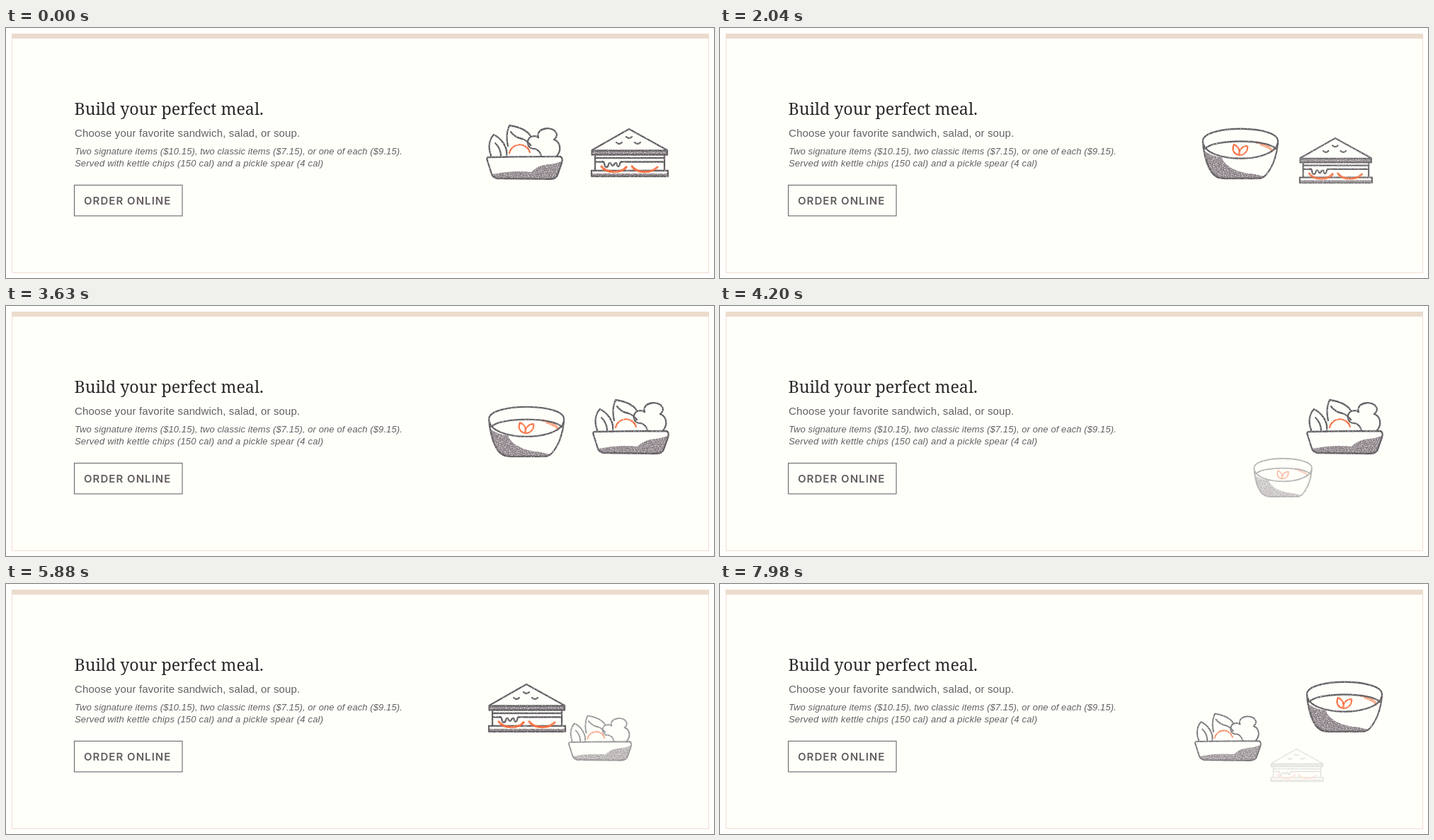
Write an HTML page that moves like this. It is 1000 px wide and 354 px high and loops after 8 s.

```html
<!DOCTYPE html>
<html lang="en">
<head>
<meta charset="utf-8">
<title>Build your perfect meal</title>
<style>
  html, body { margin: 0; width: 100%; height: 100%; overflow: hidden; background: #fefefd; }
  svg { display: block; width: 1000px; height: 354px; }
  text { font-family: "Liberation Sans", Arial, sans-serif; fill: #646062; }
  .title { font: 23.2px "Noto Serif", serif; fill: #2b2728; }
  .lead { font-size: 15px; letter-spacing: .14px; }
  .note { font-size: 13px; font-style: italic; }
  .button { font: 600 15px Inter, sans-serif; letter-spacing: 1.05px; fill: #625c5e; }
  .ink { fill: none; stroke: #5f5c60; stroke-width: 2.3; stroke-linecap: round; stroke-linejoin: round; filter: url(#pencil); }
  .paper { fill: #fffffa; }
  .shade { fill: #867c82; filter: url(#grain); }
  .orange { fill: none; stroke: #f56d3e; stroke-width: 2.2; stroke-linecap: round; filter: url(#pencil); }
  .thick { stroke-width: 3.2; }
</style>
</head>
<body>
<svg viewBox="0 0 1000 354">
  <defs>
    <filter id="pencil" filterUnits="userSpaceOnUse" x="660" y="120" width="290" height="110" color-interpolation-filters="sRGB">
      <feTurbulence type="fractalNoise" baseFrequency=".6" numOctaves="2" seed="4" result="noise"/>
      <feDisplacementMap in="SourceGraphic" in2="noise" scale=".9" xChannelSelector="R" yChannelSelector="G" result="rough"/>
      <feColorMatrix in="noise" values="0 0 0 0 0  0 0 0 0 0  0 0 0 0 0  0 0 0 2 0" result="mask"/>
      <feComposite in="rough" in2="mask" operator="in"/>
    </filter>
    <filter id="grain" filterUnits="userSpaceOnUse" x="660" y="120" width="290" height="110" color-interpolation-filters="sRGB">
      <feTurbulence type="fractalNoise" baseFrequency=".8" numOctaves="2" seed="9"/>
      <feColorMatrix values="0 0 0 0 0  0 0 0 0 0  0 0 0 0 0  0 0 0 2.4 -.35" result="mask"/>
      <feComposite in="SourceGraphic" in2="mask" operator="in"/>
    </filter>
  </defs>

  <rect width="1000" height="354" fill="#fefefd"/>
  <rect x="8.5" y="8.5" width="984" height="338" fill="#fffffa" stroke="#f5dcd3"/>
  <rect x="8" y="8" width="985" height="7" fill="#ecdbcc"/>

  <text class="title" x="96.500" y="123">Build your perfect meal.</text>
  <text class="lead" x="97" y="154">Choose your favorite sandwich, salad, or soup.</text>
  <text class="note" x="97" y="179" letter-spacing=".09">Two signature items ($10.15), two classic items ($7.15), or one of each ($9.15).</text>
  <text class="note" x="97" y="195.500" letter-spacing=".19">Served with kettle chips (150 cal) and a pickle spear (4 cal)</text>
  <rect x="96.500" y="222.500" width="152.500" height="43.500" fill="none" stroke="#6b6768" stroke-width="1.1"/>
  <text class="button" x="110" y="249.500">ORDER ONLINE</text>

  <g id="soup">
    <path class="paper" d="M682 160C682 136 789 136 789 160C787 185 781 213 764 213H707C690 213 683 186 682 160Z"/>
    <path class="shade" d="M684 174C692 180 701 182 709 183C713 196 730 205 756 207L768 210Q766 213 761 213H710C696 212 688 196 684 174Z"/>
    <path class="orange thick" opacity=".6" d="M758 162Q775 165 780 174M764 165Q776 169 780 174"/>
    <path class="ink" d="M682 160C682 137 788 137 788 160C788 193 682 193 682 160ZM685 171C697 157 773 157 785 171M682 163C684 183 690 205 702 211Q706 213 713 213H760Q767 213 771 208C781 197 786 182 788 163"/>
    <path class="orange" d="M733 180C724 178 723 170 726 165C733 168 735 174 733 180ZM733 180C733 172 738 167 745 167C746 174 741 180 733 180Z"/>
  </g>

  <g id="salad">
    <path class="paper" d="M682 183C681 168 683 157 689 151C697 155 704 161 707 168C706 155 708 145 711 138C725 140 736 145 741 153L751 153C748 140 777 138 777 153C786 160 784 172 779 182L786 184L778 212L692 213L679 184Z"/>
    <path class="orange" d="M711 177C715 162 735 161 740 176"/>
    <path class="ink" d="M685 181C680 168 683 157 689 151C699 156 709 168 707 181M691 163C697 169 699 175 699 181M709 167C706 155 708 145 711 138C725 140 736 145 741 153M713 147C718 154 724 156 729 157Q737 160 741 166"/>
    <path class="ink" d="M756 181C755 176 751 172 747 171C735 172 734 157 742 154Q748 152 752 155C747 140 777 137 778 152Q777 156 774 158C783 161 785 173 778 181"/>
    <path class="shade" d="M687 207Q718 201 742 204Q751 194 768 193Q779 192 785 188L779 208Q777 214 768 214L694 213Q688 212 687 207Z"/>
    <path class="ink" d="M682 183Q733 182 783 182Q787 184 785 191L779 208Q777 214 768 214L694 213Q688 212 686 207L680 188Q678 183 682 183Z"/>
  </g>

  <g id="sandwich">
    <path class="paper" d="M880 143L934 173V180L930 181V202H935V210H827V202H832V181L827 180V173Z"/>
    <path class="shade" d="M828 174H934V179H828ZM828 206H934V209H828Z"/>
    <path class="ink" d="M880 143L934 173V179.500H827.500V173ZM828 173.500H933M832 181V201M930 181V201M832 184H929M832 189.500H843M869 189.500H930M827 202H935V210H827Z"/>
    <path class="ink" d="M843 189C847 190 844 197 848 197C852 197 850 191 853 191C856 191 854 195 857 195C860 195 858 191 861 191C864 191 862 196 865 196C868 196 866 190 869 189.500"/>
    <path class="orange thick" d="M841 196C848 206 869 206 876 197M884 196C891 206 912 206 920 197"/>
    <path class="ink" d="M876 154Q880 158 884 154M862 162Q866 166 870 162M888 162Q892 166 896 162"/>
  </g>
</svg>

<script>
const LOOP = 8000, STEP = 1800;

// centre of each drawing, and where it rests on either side
const items = {
  salad:    { at: [732.5, 176.5], left: [732.5, 176.5], right: [882.5, 171.5] },
  soup:     { at: [735, 178],     left: [735, 178],     right: [882, 174] },
  sandwich: { at: [881, 176.5],   left: [736, 175.5],   right: [881, 176.5] }
};

// side, leaving, arriving, staying
const swaps = [
  ["left", "salad", "soup", "sandwich"],
  ["right", "sandwich", "salad", "soup"],
  ["left", "soup", "sandwich", "salad"],
  ["right", "salad", "soup", "sandwich"],
  ["left", "sandwich", "salad", "soup"]
];

// how far arrivals swing outwards on each side
const swing = { left: .5, right: 1 };

// time, x towards the middle, y, scale, opacity
const leave = [
  [0, 0, 0, 1, 1],
  [240, 11, 11, .945, .94],
  [600, 60, 65, .77, .48],
  [780, 79, 81, .685, .18],
  [1000, 95, 97, .6, 0]
];
const arrive = [
  [600, 25, 92, .7, 0],
  [690, -10, 62, .8, .5],
  [780, -30, 41, .87, .84],
  [930, -19, 30, .945, .97],
  [1080, -7, 10, .985, 1],
  [1200, 0, 0, 1, 1]
];

// smooth cubic through the rows of a table
function sample(rows, t) {
  const end = rows.length - 1;
  if (t <= rows[0][0]) return rows[0].slice(1);
  if (t >= rows[end][0]) return rows[end].slice(1);
  const i = rows.findIndex(r => r[0] > t) - 1;
  const a = rows[i], b = rows[i + 1], h = b[0] - a[0], u = (t - a[0]) / h;
  const slope = (k, c) => k === 0 || k === end ? 0
    : (rows[k + 1][c] - rows[k - 1][c]) / (rows[k + 1][0] - rows[k - 1][0]);
  return [1, 2, 3, 4].map(c =>
    a[c] + (b[c] - a[c]) * u * u * (3 - 2 * u) +
    h * u * (1 - u) * (slope(i, c) * (1 - u) - slope(i + 1, c) * u));
}

function place(name, side, [dx, dy, scale, opacity]) {
  const { at, [side]: rest } = items[name];
  const x = rest[0] + (side === "left" ? dx : -dx), y = rest[1] + dy;
  const node = document.getElementById(name);
  node.setAttribute("transform", `translate(${x} ${y}) scale(${scale}) translate(${-at[0]} ${-at[1]})`);
  node.setAttribute("opacity", Math.max(0, Math.min(1, opacity)));
}

function draw(time) {
  const t = time % LOOP, n = Math.floor(t / STEP), local = t - n * STEP;
  const [side, out, next, stay] = swaps[n];
  const [dx, ...pose] = sample(arrive, local);
  place(out, side, sample(leave, local));
  place(next, side, [dx * swing[side], ...pose]);
  place(stay, side === "left" ? "right" : "left", [0, 0, 1, 1]);
}

const start = performance.now();
function tick() {
  draw(performance.now() - start);
  requestAnimationFrame(tick);
}
tick();
</script>
</body>
</html>
```
